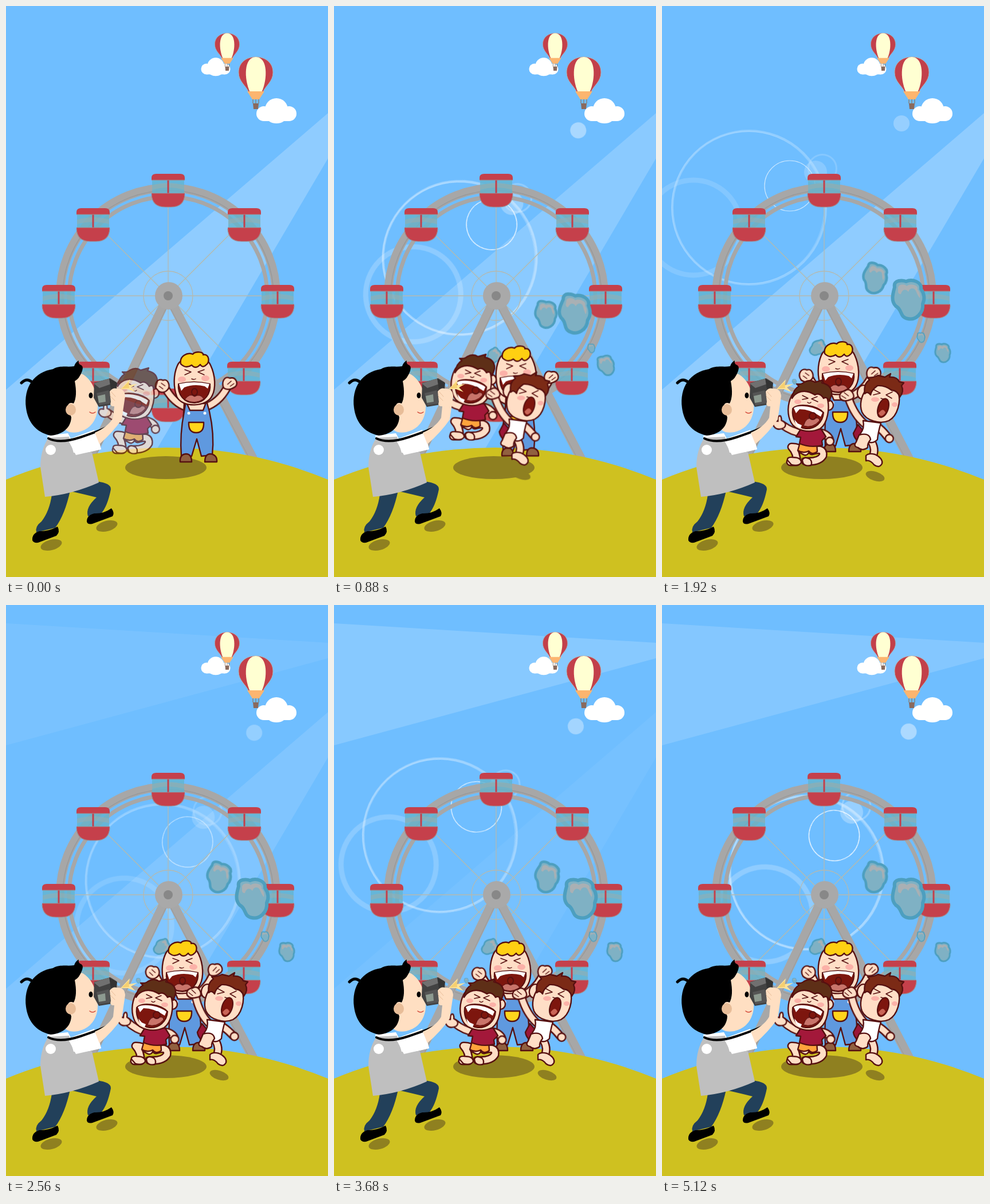
An HTML page for the animation above (5200 ms loop, 562 px wide and 997 px high).

```html
<!DOCTYPE html>
<html lang="en">
<head>
<meta charset="utf-8">
<title>Group photo at the fair</title>
<style>
html, body { margin: 0; width: 100%; height: 100%; overflow: hidden; background: #6fbeff; }
svg { display: block; width: 100%; height: 100%; }
.line { fill: none; stroke-linecap: round; stroke-linejoin: round; }
.ink { stroke: #561010; stroke-width: 2.4; stroke-linejoin: round; }
.skin { fill: #ffdec6; }
.limb { fill: none; stroke: #ffdec6; stroke-width: 10; stroke-linecap: round; stroke-linejoin: round; }
.limb.rim { stroke: #561010; stroke-width: 15; }
.face { fill: none; stroke: #561010; stroke-width: 1.5; stroke-linecap: round; stroke-linejoin: round; }
.blush { fill: #fbb1a8; }
.mouth { fill: #7d160e; stroke: #561010; stroke-width: 2; }
.tongue { fill: #c9746a; stroke: #561010; }
.shade { fill: #8f8020; }
.steel { fill: none; stroke: #a7a7a7; }
.thin { fill: none; stroke: #b4b9af; stroke-width: 1.3; }
.glow { fill: #fff; animation: 2320ms linear infinite; }
#low { animation-name: low; }
#high { animation-name: high; }
#flare { transform-origin: 460px 185px; animation: sweep 2320ms linear infinite, flare 2320ms linear infinite; }
#flare .line { stroke: #fff; }
#blond { animation: blond 1920ms linear both; }
#red { animation: red 1920ms linear both; }
#vest { animation: vest 1920ms linear both; }
.bubble { animation: float 1120ms ease-out both; }
.sway { animation: sway 480ms ease-in-out infinite alternate; }
.back { animation-direction: alternate-reverse; }
@keyframes sweep { from { transform: rotate(-33.6deg); } to { transform: rotate(7deg); } }
@keyframes flare { 0%, 100% { opacity: 0; } 17%, 26% { opacity: 1; } 55% { opacity: .88; } 83% { opacity: .65; } }
@keyframes low {
  0%, 42%, 83%, 100% { opacity: .23; } 10% { opacity: .13; } 18%, 26%, 66%, 70% { opacity: 0; }
  34.5% { opacity: .16; } 55% { opacity: .08; }
}
@keyframes high {
  0%, 6%, 32%, 44%, 74%, 100% { opacity: 0; } 17%, 60% { opacity: .18; } 20.7% { opacity: .15; }
  24.2% { opacity: .09; } 55% { opacity: .15; }
}
@keyframes blond {
  0% { transform: translate(21px, 18px); } 29.2% { transform: translate(14px, 11px); }
  66.7% { transform: translate(5px, 3px); } 90%, 100% { transform: none; }
}
@keyframes red {
  0% { transform: translate(-32px, -21px); opacity: .72; } 12.5% { transform: translate(-28px, -46px); opacity: 1; }
  29.2% { transform: translate(-22px, -58px); } 48% { transform: translate(-15px, -43px); }
  66.7% { transform: translate(-9px, -15px); } 85%, 100% { transform: none; }
}
@keyframes vest {
  0%, 8% { transform: translate(-105px, -6px); opacity: 0; } 25% { opacity: 1; }
  29.2% { transform: translate(-69px, -4px); } 66.7% { transform: translate(-16px, -1px); } 90%, 100% { transform: none; }
}
@keyframes float {
  0%, 14% { transform: var(--from); opacity: 0; } 40% { opacity: 1; } 50% { transform: var(--from); }
}
@keyframes sway { from { transform: rotate(-4deg); } to { transform: rotate(4deg); } }
</style>
</head>
<body>
<svg viewBox="0 0 562 997" preserveAspectRatio="none">
<defs>
  <g id="cabin">
    <path d="M-28-18H28V6H-28Z" fill="#63b4cf" opacity=".8"/>
    <path d="M-28-9Q0-17 28-9V-1Q0-9-28-1Z" fill="#9aaeb0" opacity=".55"/>
    <path d="M0-18V6" stroke="#c33f4b" stroke-width="3"/>
    <path d="M-29-18V-22Q-29-29-21-29H21Q29-29 29-22V-18ZM-29 5H29Q28 29 5 29H-5Q-28 29-29 5Z" fill="#c5404b"/>
    <path d="M-29-18H29M-29 5H29M-29 7Q-28 29-5 29H5Q28 29 29 7" fill="none" stroke="#a2868a" stroke-width="1.2"/>
  </g>
  <g id="balloon">
    <path d="M-12 62C-17 50-30 43-30 27C-30 10-17 0 0 0S30 10 30 27C30 43 17 50 12 62Z" fill="#c2404a" stroke="#b3abae" stroke-width="1"/>
    <path d="M-10 62C-21 38-21 0 0 0S21 38 10 62Z" fill="#ffffd2"/>
    <path d="M-15 60H15L6 74H-6Z" fill="#fcb56f"/>
    <path d="M-5 74V81M5 74V81M0 74V81" stroke="#8a7660" stroke-width="1.2"/>
    <path d="M-5 81H5L4 91H-4Z" fill="#8a6a5d"/>
  </g>
  <g id="cloud" fill="#fff">
    <circle cy="-3" r="20"/><circle cx="-22" cy="4" r="13"/><circle cx="22" cy="4" r="13"/>
    <rect x="-22" y="-2" width="44" height="19"/><ellipse cy="10" rx="17" ry="11"/>
  </g>
  <g id="drop">
    <path d="M-24-22C-27-36-9-34-4-32C7-37 24-31 22-19C28-10 29-1 25 7C27 24 12 36-1 33C-16 30-10 17-22 11C-31 2-27-11-24-22Z" fill="#7fb1c4" stroke="#4d9fbf" stroke-width="6"/>
    <path d="M-18-18C-20-29-5-28-3-24C4-30 19-25 16-18C21-13 21-7 20-3C13-11 14-20 7-20Q2-20 0-14C-5-20-11-18-13-10Q-19-9-18-18Z" fill="#a9b0b4"/>
  </g>
  <g id="star"><path d="M0 13L16-4L14 6L29 4L18 10L26 18L13 13Z" fill="#ffe49a"/><path d="M2 12L14 0L15 11Z" fill="#f5cf70"/></g>
</defs>

<rect width="562" height="997" fill="#6fbeff"/>
<path id="high" class="glow" d="M0 32L562 66V93L0 245Z"/>
<path id="low" class="glow" d="M562 187V266L262 776L0 900V670Z"/>

<g id="flare">
  <circle class="line" cx="55" cy="387" r="83" stroke-width="9" opacity=".22"/>
  <circle class="line" cx="152" cy="352" r="134" stroke-width="4" opacity=".38"/>
  <circle class="line" cx="150" cy="352" r="133" stroke-width="1" opacity=".3"/>
  <circle class="line" cx="223" cy="314" r="44" stroke-width="1.2"/>
  <circle cx="268" cy="290" r="20" fill="#fff" opacity=".28"/>
  <circle class="line" cx="280" cy="284" r="24.5" stroke-width="3" opacity=".25"/>
  <circle cx="418" cy="205" r="14" fill="#fff" opacity=".42"/>
</g>

<g id="wheel">
  <g id="spokes" class="thin"><circle cx="283" cy="506" r="43"/></g>
  <circle class="steel" cx="283" cy="506" r="188.5" stroke-width="15"/>
  <circle class="steel" cx="283" cy="506" r="173" stroke-width="7"/>
  <circle class="line" cx="283" cy="506" r="184" stroke="#999" stroke-width="1.5"/>
  <path class="steel" d="M147 790L283 506L434 796" stroke-width="16"/>
  <path class="line" d="M154 790L289 508M428 796L283 520" stroke="#999" stroke-width="1"/>
  <circle cx="284" cy="506" r="24" fill="#a9a9a9"/><circle cx="283" cy="506" r="8" fill="#888"/>
  <g id="cabins"></g>
</g>

<use href="#cloud" transform="translate(366 107) scale(.73)"/>
<use href="#balloon" transform="translate(386 47.500) scale(.72)"/>
<use href="#balloon" x="436" y="89"/>
<use href="#cloud" x="472" y="184"/>

<circle cx="281" cy="1504" r="733" fill="#cfc120"/>
<ellipse class="shade" cx="279" cy="806" rx="71" ry="20"/>
<g id="bubbles"></g>

<g id="blond">
  <g class="sway" style="transform-origin:290px 680px"><path class="limb" d="M294 683Q272 674 260 648"/><path class="skin ink" d="M245 650C238 639 247 628 256 633C266 630 269 646 263 650Q255 658 245 650Z"/><path class="face" d="M253 638L259 643M249 643L255 648"/></g>
  <g class="sway back" style="transform-origin:328px 680px"><path class="limb" d="M326 683Q350 673 362 647"/><path class="skin ink" d="M357 647C351 637 357 625 366 629C377 625 382 638 377 643Q366 652 357 647Z"/><path class="face" d="M369 634L363 640M374 638L368 643"/></g>
  <path class="skin ink" d="M290 676H330L332 710H288Z"/>
  <path class="ink" d="M293 672L300 688H323L329 672L334 690Q343 730 339 766L320 768L312 738L303 768H285Q282 730 290 690Z" fill="#5f99df"/>
  <path class="ink" d="M298 709H324Q325 727 311 727T298 709Z" fill="#ffd51c" stroke-width="1.500"/>
  <circle cx="298" cy="693" r="2.500" fill="#fff"/><circle cx="326" cy="693" r="2.500" fill="#fff"/>
  <path class="ink" d="M283 778Q282 765 293 764Q303 764 303 778ZM326 778Q326 764 336 764Q348 766 347 778Z" fill="#91603f"/>
  <path class="skin ink" d="M278 610C285 591 328 590 336 609C345 628 345 650 339 662C330 683 286 684 277 664C271 647 271 626 278 610Z"/>
  <path class="ink" d="M284 607C281 593 296 586 305 590C310 584 325 586 323 591C335 589 334 605 329 608Q322 615 318 608Q310 617 303 609Q293 616 284 607Z" fill="#ffd012"/>
  <path class="face" d="M291 617L302 621L291 626M325 617L314 621L325 626M303 633Q307 635 310 633"/>
  <ellipse class="blush" cx="286" cy="634" rx="7" ry="5"/><ellipse class="blush" cx="327" cy="632" rx="7" ry="5"/>
  <path class="mouth" d="M280 642Q307 635 335 642C337 658 326 675 308 675S278 661 280 642Z"/>
  <path d="M281 642Q307 636 334 642L331 650L326 646Q307 641 290 648L285 654Z" fill="#fff"/>
  <path class="tongue" d="M291 669Q300 657 308 664Q318 658 324 668Q308 679 291 669Z"/>
  <ellipse class="mouth" cx="308" cy="656" rx="5" ry="6" fill="#a94a40"/>
</g>

<g id="red">
  <g class="sway" style="transform-origin:246px 746px"><path class="limb" d="M246 746Q227 743 210 728"/><path class="skin ink" d="M195 728Q195 719 204 722Q204 711 209 713Q211 717 210 721Q221 727 214 734Q200 740 195 728Z"/></g>
  <path class="limb" d="M250 778Q236 769 226 770Q236 781 235 796H224M262 777Q283 770 281 785Q274 797 250 795"/>
  <path class="skin ink" d="M219 793Q218 787 228 788Q243 788 243 797Q239 804 226 801ZM245 793Q247 786 258 791Q263 796 260 802Q246 805 245 793Z"/>
  <path class="ink" d="M241 762H270L271 778Q262 785 256 777Q247 782 237 776Z" fill="#ffa43c"/>
  <g class="sway back" style="transform-origin:278px 744px"><path class="limb" d="M278 745Q291 748 294 757"/><circle class="skin ink" cx="294" cy="759" r="7"/></g>
  <path class="ink" d="M242 739H278L286 752L279 759L280 767Q258 772 240 764L242 753L234 752Z" fill="#a3183a"/>
  <circle class="skin ink" cx="290" cy="697" r="9"/>
  <path class="skin ink" d="M226 681C236 660 278 656 287 680C295 702 288 730 276 738C257 747 232 741 225 727C218 713 219 695 226 681Z"/>
  <path class="ink" d="M227 685Q229 669 239 664L235 660Q244 661 248 657Q259 651 267 657L281 653L279 658Q297 662 296 678L292 690Q288 681 282 685Q275 674 267 679Q251 669 238 675Q231 678 227 685Z" fill="#5e2f17"/>
  <path class="face" d="M245 680L255 685L245 687M271 682L261 686L272 691M254 692Q257 695 260 692"/>
  <ellipse class="blush" cx="237" cy="691" rx="6" ry="4"/><ellipse class="blush" cx="277" cy="698" rx="6" ry="4"/>
  <path class="mouth" d="M228 703C236 692 271 697 282 710C281 728 266 739 251 738C234 736 226 720 228 703Z"/>
  <path d="M230 702C239 695 268 700 280 710L277 717Q259 704 240 704L234 711ZM231 722L237 729L244 732L242 737Q233 734 231 722Z" fill="#fff"/>
  <path class="tongue" d="M247 733Q252 716 263 721Q275 717 275 724Q263 738 247 733Z"/>
  <circle class="mouth" cx="263" cy="716" r="6"/>
</g>

<g id="vest">
  <ellipse class="shade" cx="372" cy="821" rx="17" ry="8" transform="rotate(18 372 821)"/>
  <path class="limb" d="M366 761Q374 776 367 787"/>
  <path class="skin ink" d="M356 785Q361 780 372 783Q386 790 384 799Q379 808 370 801Q363 792 356 794Z"/>
  <g class="sway" style="transform-origin:352px 730px"><path class="limb" d="M354 730Q337 714 329 684"/><path class="skin ink" d="M314 682Q312 672 323 670Q330 665 336 673Q342 684 331 686Q319 690 314 682Z"/><path class="face" d="M322 673L329 679M317 678L324 683"/></g>
  <g class="sway back" style="transform-origin:379px 737px"><path class="limb" d="M378 736Q388 743 396 753"/><circle class="skin ink" cx="398" cy="754" r="7"/></g>
  <path class="ink" d="M342 731L363 755L354 766Q336 760 334 746Z" fill="#9b1738"/>
  <path class="ink" d="M351 724L382 728Q377 745 376 757Q367 767 354 758L346 747Q354 737 351 724Z" fill="#fff"/>
  <path class="skin ink" d="M344 749Q362 744 364 757Q358 764 359 771Q350 778 342 771Q333 769 339 761Z"/>
  <ellipse class="skin ink" cx="350" cy="674" rx="9" ry="12" transform="rotate(15 350 674)"/>
  <path class="skin ink" d="M356 670C366 652 402 651 412 672C418 691 411 716 396 724C380 731 356 724 349 709C344 696 348 681 356 670Z"/>
  <path class="ink" d="M354 677Q351 660 362 653L359 649Q370 649 377 645L389 648L399 642L397 648Q410 647 414 656L422 658L418 663Q423 673 415 683Q411 671 401 671Q389 662 376 663Q365 671 364 679Q359 672 354 677Z" fill="#7b2a16"/>
  <path class="face" d="M370 670L381 676L369 679M402 674L391 679L401 685M382 685L388 687"/>
  <ellipse class="blush" cx="372" cy="687" rx="7" ry="4"/><ellipse class="blush" cx="406" cy="696" rx="5" ry="4"/>
  <ellipse class="mouth" cx="386" cy="702" rx="9" ry="17" transform="rotate(18 386 702)" fill="#8d180f"/>
  <path d="M378 711Q386 700 390 710Q382 721 378 711Z" fill="#c96557"/>
</g>
<use href="#star" x="200" y="656"/>

<g id="photographer">
  <ellipse class="shade" cx="79" cy="941" rx="19" ry="9" transform="rotate(-15 79 941)"/>
  <ellipse class="shade" cx="176" cy="908" rx="19" ry="9" transform="rotate(-15 176 908)"/>
  <path d="M80 853L112 846Q103 888 86 911L53 919Q50 909 62 900Q76 882 80 853ZM116 848L158 830Q184 833 183 844Q177 874 166 886L143 891Q138 876 158 858Q134 852 116 848Z" fill="#22405a"/>
  <path d="M46 933Q45 921 58 917Q73 918 90 909Q95 918 88 925L56 937Q48 938 46 933ZM141 900Q141 889 154 886Q170 887 184 877Q190 885 186 891L151 904Q142 906 141 900Z"/>
  <path d="M72 750L108 746L114 757L158 741L166 774L124 784L75 764Z" fill="#fff"/>
  <path d="M74 754L110 752L118 780L150 779L162 832Q115 853 68 857L60 805Q60 775 74 754Z" fill="#bfbfbf"/>
  <path d="M108 757L154 740L166 774L122 784Z" fill="#fff"/>
  <path d="M104 660Q119 638 134 643Q150 653 156 674Q163 699 158 714Q151 738 126 744Q104 748 98 731Z" fill="#ffdfc2"/>
  <path d="M35 702C30 665 50 639 82 634C94 627 107 631 119 629Q121 622 127 619Q126 624 129 626Q136 628 133 637Q128 651 120 655Q125 681 118 694Q108 690 107 702L114 718C113 740 94 749 78 750C50 744 38 724 35 702Z"/>
  <path class="line" d="M51 663Q39 646 27 658" stroke="#000" stroke-width="5"/>
  <ellipse cx="113" cy="705" rx="9" ry="10" fill="#e8bd98"/>
  <ellipse cx="148" cy="680" rx="3.500" ry="5"/>
  <path class="line" d="M146 709Q151 713 156 709" stroke="#d44a3a" stroke-width="1.500"/>
  <path d="M154 658L182 650L193 657L192 695L162 700L153 684Z" fill="#424242"/>
  <path d="M153 659L181 650L192 657L163 667Z" fill="#707070"/>
  <path d="M158 676L179 671L187 693L163 697Z" fill="#555"/><path d="M160 681L173 678L174 691L162 693Z" fill="#8d9a90"/>
  <path d="M180 650L194 658L193 668L183 669Z" fill="#333"/>
  <path class="line" d="M74 755Q94 765 130 753T181 733" stroke="#000" stroke-width="4"/>
  <path d="M181 673Q187 666 193 668Q207 667 208 681Q204 708 202 722Q186 745 163 765L155 745Q178 735 187 719L189 699Q180 700 183 691Z" fill="#ffdfc2"/>
  <path class="line" d="M184 674L191 682M182 681L190 689" stroke="#e8bd98" stroke-width="1"/>
  <circle cx="78" cy="775" r="9" fill="#fff"/>
</g>
</svg>
<script>
const LOOP = 5200, FRAME = 80;
const add = (id, html) => document.getElementById(id).insertAdjacentHTML('beforeend', html);

for (let a = 0; a < 8; a++)
  add('spokes', `<path d="M283 506H456" transform="rotate(${a * 45} 283 506)"/>`);

[[283, 322], [152, 382], [416, 382], [92, 516], [474, 516], [152, 650], [415, 650], [283, 697]]
  .forEach(([x, y]) => add('cabins', `<use href="#cabin" x="${x}" y="${y}"/>`));

// Resting x, y, scale, angle, then starting x, y, scale, angle.
[[430, 513, 1, 0, 387, 615, .92, 40], [371, 476, .75, 20, 365, 736, .45, -30],
 [490, 606, .48, 0, 427, 697, .62, -50], [452, 579, .25, 0, 440, 657, .15, 0],
 [271, 597, .43, 65, 300, 655, .35, 0], [231, 656, .13, 0, 384, 657, .15, 0]]
  .forEach(b => {
    const pose = ([x, y, s, r]) => `translate(${x}px,${y}px) rotate(${r}deg) scale(${s})`;
    add('bubbles', `<use href="#drop" class="bubble" style="transform:${pose(b)};--from:${pose(b.slice(4))}"/>`);
  });

// Outline each limb with a wider stroke underneath.
document.querySelectorAll('.limb').forEach(limb => {
  const rim = limb.cloneNode();
  rim.classList.add('rim');
  limb.before(rim);
});

// One clock drives all keyframes, so every track restarts with the loop.
const tracks = document.getAnimations();
tracks.forEach(track => track.pause());
const start = performance.now();
function tick() {
  const time = (performance.now() - start) % LOOP;
  const held = Math.floor(time / FRAME) * FRAME;
  tracks.forEach(track => { track.currentTime = held; });
  requestAnimationFrame(tick);
}
tick();
</script>
</body>
</html>
```
